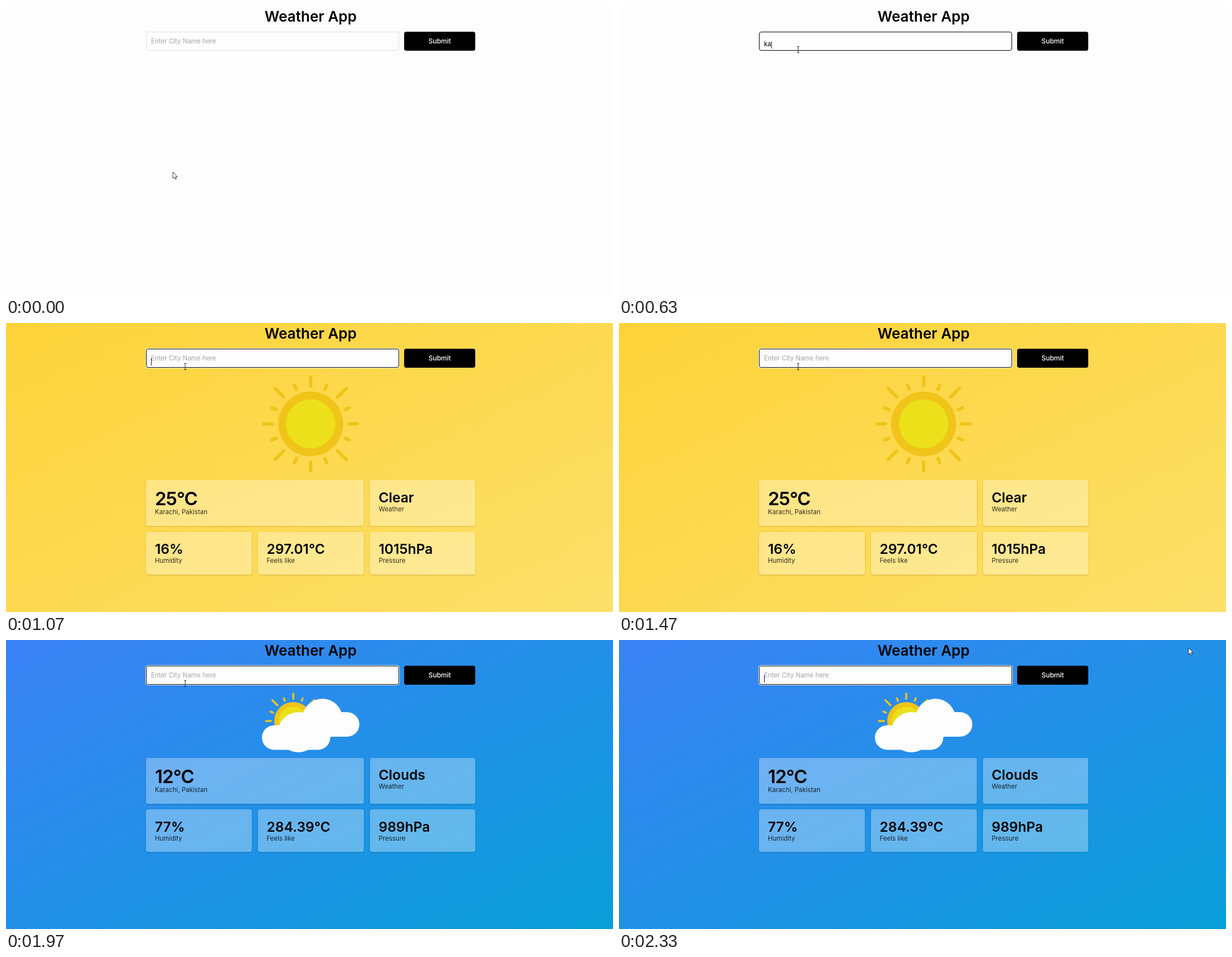
Animation, 1084 px wide and 517 px high, one loop 2360 ms. Source, as an HTML page:

```html
<!DOCTYPE html>
<html lang="en">
<head>
<meta charset="utf-8">
<title>Weather App</title>
<style>
  html, body { margin: 0; width: 100%; height: 100%; overflow: hidden; }
  body { position: relative; background: #fdfdfd; color: #000; font: 400 11.5px Inter, sans-serif; }
  body * { box-sizing: border-box; }
  .scene, .card, .line, .field, .button, .icon, .cursor, h1 { position: absolute; margin: 0; }
  .line, h1 { line-height: 0; white-space: nowrap; }

  h1 { left: 0; width: 1088px; top: 19px; text-align: center; font-size: 26px; font-weight: 600; }
  .button {
    left: 711px; top: 46px; width: 127px; height: 34px; border-radius: 4px;
    background: #000; color: #fff; font-size: 12px; font-weight: 500; line-height: 33px; text-align: center;
  }

  .field {
    left: 250px; top: 46px; width: 452px; height: 34px; border-radius: 4px;
    background: #fdfdfd; border: 1px solid #dfe1d2;
    animation: focus 2360ms step-end infinite;
  }
  .field .line { left: 8px; top: 15.5px; }
  .hint { color: #a3a5a8; animation: hint 2360ms step-end infinite; }
  .word { font-size: 0; animation: 2360ms step-end infinite; }
  .first { animation-name: first; }
  .second { animation-name: second; }
  .word span { font-size: 0; animation: key 2360ms step-end calc(var(--at) * 1ms) infinite; }
  .caret {
    display: inline-block; width: 1px; height: 13px; vertical-align: middle; background: #222;
    animation: blink 2360ms step-end infinite;
  }

  .scene { left: 0; top: 0; width: 100%; height: 100%; visibility: hidden; animation: 2360ms step-end infinite; }
  .sunny { background: linear-gradient(to bottom right, #fdd338, #fde06a); animation-name: sunny; }
  .cloudy { background: linear-gradient(to bottom right, #3b82f6, #089fd9); animation-name: cloudy; }
  .icon { left: 0; top: 0; }
  .card { border-radius: 4px; background: rgba(255, 255, 255, .32); box-shadow: 0 1px 3px rgba(0, 0, 0, .18); }
  .card .line { left: 16px; }
  .value { top: 30.5px; font-size: 24.5px; font-weight: 600; }
  .label { top: 51.5px; color: rgba(0, 0, 0, .8); }
  .main .value { top: 33px; font-size: 33px; letter-spacing: -1px; }
  .main .label { top: 57px; }

  .cursor { left: 0; top: 0; width: 1px; height: 1px; overflow: visible; animation: move 2360ms linear infinite; }
  .arrow { animation: arrow 2360ms step-end infinite; }
  .beam { animation: beam 2360ms step-end infinite; }

  @keyframes focus {
    0%, 100% { border: 1px solid #dfe1d2; box-shadow: none; }
    19.91% { border: 1.5px solid #000; box-shadow: 0 0 0 1px #fdfdfd; }
  }
  @keyframes hint {
    0%, 39.4%, 81.77%, 100% { visibility: visible; }
    24.15%, 69.06% { visibility: hidden; }
  }
  @keyframes first {
    0%, 39.4%, 100% { font-size: 0; }
    24.15% { font-size: 11.5px; }
  }
  @keyframes second {
    0%, 81.77%, 100% { font-size: 0; }
    69.06% { font-size: 11.5px; }
  }
  @keyframes key {
    0% { font-size: 1em; }
    30%, 100% { font-size: 0; }
  }
  @keyframes blink {
    0%, 22.8%, 39.4%, 50.4%, 60.6%, 81.77%, 90.25%, 100% { opacity: 0; }
    19.91%, 24.15%, 45.33%, 55.5%, 66.52%, 86.86%, 95.33% { opacity: 1; }
  }
  @keyframes sunny {
    0%, 83.47%, 100% { visibility: hidden; }
    45.33% { visibility: visible; }
  }
  @keyframes cloudy {
    0%, 100% { visibility: hidden; }
    83.47% { visibility: visible; }
  }
  @keyframes move {
    0%, 1% { transform: translate(298px, 297px); animation-timing-function: ease-in-out; }
    16.94% { transform: translate(318px, 78px); }
    18.22%, 90.7% { transform: translate(320px, 78px); animation-timing-function: ease-in-out; }
    98.72%, 100% { transform: translate(1017px, 14px); }
  }
  @keyframes arrow {
    0%, 95%, 100% { opacity: 1; }
    16% { opacity: 0; }
  }
  @keyframes beam {
    0%, 95%, 100% { opacity: 0; }
    16% { opacity: 1; }
  }
</style>
</head>
<body>
<div class="scene sunny">
  <svg class="icon" width="1084" height="280">
    <g id="sun" transform="translate(544 180.5)">
      <g id="rays" stroke="#f0c419" stroke-width="6" stroke-linecap="round"></g>
      <circle r="58" fill="#f0c419"/>
      <circle r="44" fill="#ebe01a"/>
    </g>
  </svg>
</div>
<div class="scene cloudy">
  <svg class="icon" width="1084" height="210">
    <use href="#sun" transform="translate(513 145) scale(.586) translate(-544 -180.5)"/>
    <g fill="#fdfdfd">
      <circle cx="565" cy="141" r="36"/>
      <rect x="522" y="129" width="109" height="44" rx="22"/>
      <circle cx="522" cy="165" r="36"/>
      <rect x="457" y="152.500" width="122" height="44" rx="22"/>
      <path d="M522 141H601V173H522Z"/>
    </g>
  </svg>
</div>

<h1>Weather App</h1>
<div class="field">
  <div class="line hint">Enter City Name here</div>
  <div class="line"><span class="word first"></span><span class="word second"></span><i class="caret"></i></div>
</div>
<div class="button">Submit</div>

<svg class="cursor">
  <path class="arrow" d="M0 0V11.500L2.700 9.200 4.500 13.300 6.400 12.500 4.700 8.500H8Z" fill="#fff" stroke="#222" stroke-width=".9"/>
  <path class="beam" d="M-2 -5.500H2M0 -5.500V5.500M-2 5.500H2" fill="none" stroke="#333"/>
</svg>

<script>
  const $ = s => document.querySelector(s);

  function add(parent, cls, text = '') {
    const el = document.createElement('div');
    el.className = cls;
    el.textContent = text;
    parent.append(el);
    return el;
  }

  // Sixteen rays: cardinal, diagonal and short ones between them
  let rays = '';
  for (let i = 0; i < 16; i++) {
    const [a, b] = i % 2 ? [67, 75] : i % 4 ? [68, 90] : [68, 83.5];
    rays += `<path d="M${a} 0H${b}" transform="rotate(${i * 22.5})"/>`;
  }
  $('#rays').innerHTML = rays;

  function addCards(scene, top, values) {
    const slots = [
      [250, 0, 389, 82, 'Karachi, Pakistan'],
      [649.5, 0, 188.5, 82, 'Weather'],
      [250, 92.5, 189, 76, 'Humidity'],
      [449.5, 92.5, 189.5, 76, 'Feels like'],
      [649.5, 92.5, 188.5, 76, 'Pressure']
    ];
    slots.forEach(([x, y, w, h, label], i) => {
      const card = add(scene, i ? 'card' : 'card main');
      card.style.cssText = `left:${x}px;top:${top + y}px;width:${w}px;height:${h}px`;
      add(card, 'line value', values[i]);
      add(card, 'line label', label);
    });
  }
  addCards($('.sunny'), 281, ['25°C', 'Clear', '16%', '297.01°C', '1015hPa']);
  addCards($('.cloudy'), 210.5, ['12°C', 'Clouds', '77%', '284.39°C', '989hPa']);

  function typeWord(word, text, start) {
    [...text].forEach((ch, i) => {
      const key = document.createElement('span');
      key.textContent = ch;
      key.style.setProperty('--at', start + i * 40);
      word.append(key);
    });
  }
  typeWord($('.first'), 'karachi', 570);
  typeWord($('.second'), 'london', 1630);
</script>
</body>
</html>
```
